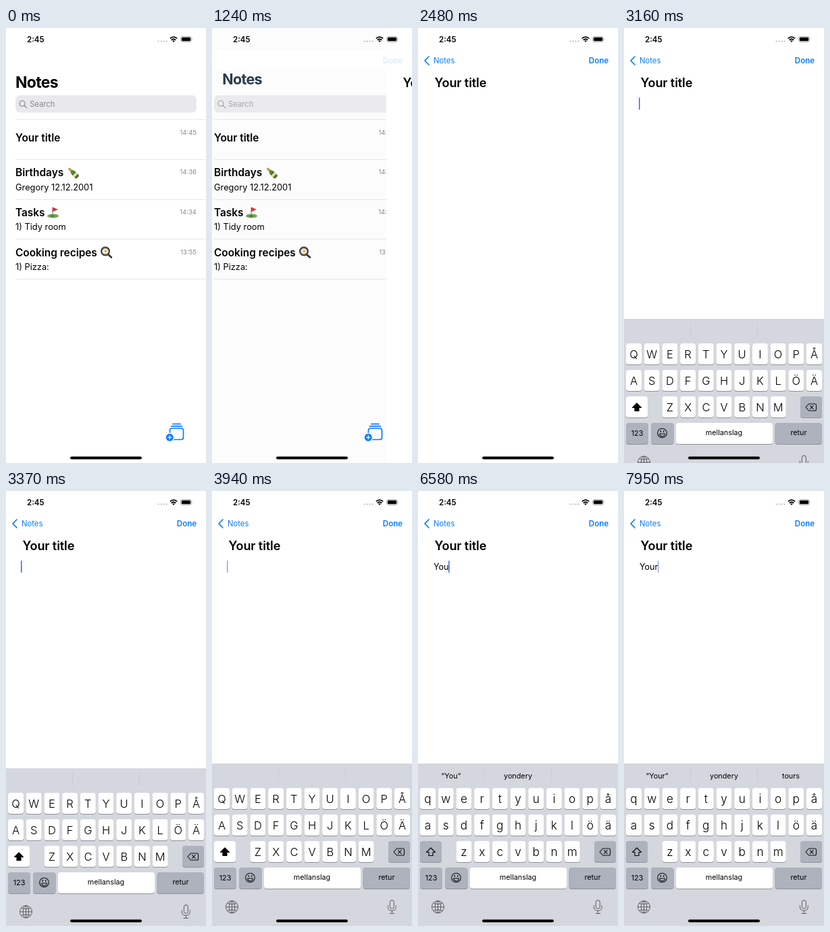
An HTML page for the animation above (8000 ms loop, 296 by 640 pixels).

```html
<!DOCTYPE html>
<html lang="en">
<head>
<meta charset="utf-8">
<title>Notes</title>
<style>
  html, body { margin: 0; width: 100%; height: 100%; overflow: hidden; background: #fff; }
  svg { display: block; width: 296px; height: 640px; font-family: Inter, "Liberation Sans", sans-serif; }
  .row { font-size: 15.4px; font-weight: 600; }
  .sub { font-size: 12.8px; }
  .time { font-size: 9.5px; fill: #8a8a8e; text-anchor: end; }
  .blue { fill: #0a7cff; }
  .line { fill: none; stroke-linecap: round; stroke-linejoin: round; }
  #keys text { text-anchor: middle; }
  .upper { font-size: 16.5px; font-weight: 350; }
  .lower { font-size: 17.2px; font-weight: 330; }
  .small { font-size: 10.8px; }
  #popup { filter: drop-shadow(0 1px 2px #0004); }
</style>
</head>
<body>
<svg viewBox="0 0 296 640">
  <rect width="296" height="640" fill="#fff"/>

  <g id="list">
    <g id="search">
      <rect x="14" y="99" width="268" height="25.5" rx="6.5" fill="#e9e9eb"/>
      <g class="line" stroke="#85858a" stroke-width="1.2">
        <circle cx="24" cy="111" r="4"/><path d="M27 114l3.5 3.5"/>
      </g>
      <text x="35" y="116" font-size="11.3" fill="#8a8a8e">Search</text>
    </g>
    <path d="M14 134.5H296M14 193.5H296M14 252.5H296M14 310.5H296M14 369.5H296" stroke="#e9e9e9"/>
    <g id="rows"></g>
    <g transform="translate(99.5 213) rotate(-45)">
      <rect x="-3.5" y="-1.5" width="7" height="11" rx="2" fill="#47702f"/>
      <path d="M-3.5 0L-1.6-5H1.6L3.5 0z" fill="#5d8a3c"/>
      <rect x="-1.7" y="-9.5" width="3.4" height="5.5" rx="1" fill="#b9a14f"/>
      <rect x="-3.5" y="2" width="7" height="4" fill="#e3d9a6"/>
    </g>
    <ellipse cx="69.5" cy="276.5" rx="8.5" ry="3" fill="#6fa653"/>
    <ellipse cx="69" cy="276.5" rx="2.2" ry=".9" fill="#35522c"/>
    <path d="M69 264V276.5" stroke="#8d8d8d" stroke-width="1.2"/>
    <path d="M69 263.5L77 267L69 270.5z" fill="#df3232"/>
    <path d="M151.5 333.5L156 337.5" stroke="#33302f" stroke-width="2.6" stroke-linecap="round"/>
    <circle cx="147" cy="328.5" r="7" fill="#3b3b3d"/>
    <circle cx="147" cy="328.5" r="5.4" fill="#77716a"/>
    <ellipse cx="147" cy="328.5" rx="4.5" ry="4" fill="#f6f3ea"/>
    <circle cx="147.3" cy="328.3" r="2" fill="#f0b53a"/>
    <g class="line" stroke="#0a7cff" stroke-width="1.7">
      <rect x="242.5" y="589" width="20" height="16.5" rx="3"/>
      <path d="M244.5 585.8H260.5M247 582.7H258"/>
    </g>
    <circle cx="242.3" cy="602.3" r="6.8" fill="#fff"/>
    <circle cx="242.3" cy="602.3" r="5.5" class="blue"/>
    <path d="M239.3 602.3h6M242.3 599.3v6" stroke="#fff" stroke-width="1.3"/>
  </g>
  <rect id="shade" width="296" height="640"/>

  <g id="detail">
    <rect width="296" height="640" fill="#fff"/>
    <text x="24.5" y="87" font-size="18.1" font-weight="600" letter-spacing="-.12">Your title</text>
    <text id="typed" x="23" y="116.3" font-size="12.5"></text>
    <rect id="caret" y="102.5" width="1.5" height="17.5" fill="#3a62e6"/>
  </g>

  <rect id="strip" y="33" width="296" height="30" fill="#fff"/>
  <text id="bigTitle" font-weight="700" letter-spacing="-.03em">Notes</text>
  <text id="back" class="blue">Notes</text>
  <path id="chevron" class="line" d="M16 42L10 48L16 54" stroke="#0a7cff" stroke-width="1.7"/>
  <text id="done" class="blue" x="282" y="52" font-size="11.5" font-weight="600" text-anchor="end">Done</text>

  <g id="keyboard">
    <rect y="401" width="296" height="239" fill="#d4d7dd"/>
    <path d="M98.5 408v19M197.5 408v19" stroke="#c8cbd1"/>
    <g id="keys"></g>
    <path id="shift" class="line" d="M19 525l-6.5 6.5h3.5v5h6v-5h3.5z" stroke="#000" stroke-width="1.1"/>
    <g class="line" stroke="#111" stroke-width="1.1">
      <path d="M269 531l4.5-5h9q2 0 2 2v6q0 2-2 2h-9zM275.5 528.7l4.6 4.6M280.1 528.7l-4.6 4.6"/>
      <circle cx="56.5" cy="569" r="6.8"/>
      <path d="M52.6 570h7.8a3.9 3.9 0 0 1-7.8 0z"/>
      <path d="M54.3 566v1M58.7 566v1" stroke-width="1.6"/>
    </g>
    <g class="line" stroke="#5b5d62">
      <circle cx="29.5" cy="612" r="9"/><ellipse cx="29.5" cy="612" rx="4.2" ry="9"/>
      <path d="M29.5 603v18M20.5 612h18M22.5 606.5q7 3 14 0M22.5 617.5q7-3 14 0"/>
      <rect x="263.3" y="602" width="6" height="12.5" rx="3"/>
      <path d="M260.3 610v1.5q0 6 6 6t6-6V610M266.3 617.5v4M263 621.5h6.6"/>
    </g>
    <g id="popup">
      <path fill="#fff" d="M-20 402q0-8 8-8H12q8 0 8 8V421c0 9-8.5 9-8.5 18V464q0 4-4 4H-7.5q-4 0-4-4V439c0-9-8.5-9-8.5-18z"/>
      <text id="popLetter" y="423.5" text-anchor="middle" font-size="26.5" font-weight="300"></text>
    </g>
  </g>

  <text x="31" y="20.5" font-size="11.5" font-weight="600">2:45</text>
  <path d="M225.5 19.5h12.1" stroke="#b5b5b5" stroke-width="2" stroke-linecap="round" stroke-dasharray=".1 3.9"/>
  <g class="line" stroke="#000" stroke-width="1.8" style="stroke-linecap:butt">
    <path d="M242.8 15.4q5.2-4.6 10.4 0M244.8 17.7q3.2-2.8 6.4 0"/>
  </g>
  <path d="M246.2 19q1.8-1.4 3.6 0L248 20.9z"/>
  <rect x="258.5" y="12.5" width="16" height="8" rx="2.4" fill="none" stroke="#aaa" stroke-width=".9"/>
  <rect x="259.8" y="13.8" width="13.4" height="5.4" rx="1.3"/>
  <path d="M275.6 15q1.4 1.5 0 3z" fill="#aaa"/>
  <rect x="95" y="630.6" width="106" height="4" rx="2"/>
</svg>

<script>
const $ = id => document.getElementById(id);
const set = (el, attrs) => { for (const k in attrs) el.setAttribute(k, attrs[k]); };
const make = (tag, parent, attrs, text = '') => {
  const el = document.createElementNS('http://www.w3.org/2000/svg', tag);
  set(el, attrs);
  el.textContent = text;
  return parent.appendChild(el);
};

// Note rows: title, subtitle, time, title baseline, time baseline
[
  ['Your title', '', '14:45', 167, 156.5],
  ['Birthdays', 'Gregory 12.12.2001', '14:36', 218, 215],
  ['Tasks', '1) Tidy room', '14:34', 276.5, 274],
  ['Cooking recipes', '1) Pizza:', '13:55', 335.5, 332.5],
].forEach(([title, sub, time, y, timeY]) => {
  make('text', $('rows'), { class: 'row', x: 14, y }, title);
  make('text', $('rows'), { class: 'sub', x: 14, y: y + 20.5 }, sub);
  make('text', $('rows'), { class: 'time', x: 282, y: timeY }, time);
});

// Keyboard
const keys = $('keys'), GREY = '#adb2bc';
const key = (x, y, w, fill = '#fff') => {
  make('rect', keys, { x, y: y + 1, width: w, height: 31, rx: 3.8, fill: '#8f9298' });
  return make('rect', keys, { x, y, width: w, height: 31, rx: 3.8, fill });
};
const letters = [['qwertyuiopå', 14.5, 437], ['asdfghjklöä', 14.5, 476], ['zxcvbnm', 68, 515]];
const keyX = (i, x0) => x0 + i * 26.7;
for (const [row, x0, y] of letters)
  [...row].forEach((c, i) => key(keyX(i, x0) - 11.5, y, 23));
const shiftKey = key(3, 515, 32);
key(261, 515, 32, GREY);
key(3, 554, 33, GREY);
key(40, 554, 33.5, GREY);
key(77, 554, 143);
key(223.5, 554, 69.5, GREY);
const label = (x, y, text) => make('text', keys, { class: 'small', x, y }, text);
label(19.5, 573, '123');
label(148, 572, 'mellanslag');
label(258.5, 572, 'retur');
const [upper, lower] = ['upper', 'lower'].map(cls => {
  const g = make('g', keys, { class: cls });
  for (const [row, x0, y] of letters)
    [...row].forEach((c, i) => make('text', g, { x: keyX(i, x0), y: y + 21.5 },
      cls === 'upper' ? c.toUpperCase() : c));
  return g;
});
const hints = [49, 148, 247].map(x => label(x, 422.5, ''));

// Each track is a list of [start, value], held until the next start
const at = (track, t) => track.reduce((v, [start, next]) => t >= start ? next : v, track[0][1]);
const held = (times, t) => times.reduce((v, s) => t >= s ? s : v, 0);

const pushTimes = [1240, 1350, 1460, 1570, 1690];
const riseTimes = [2940, 3050, 3160, 3270, 3380, 3490, 3610];
const typed = [[0, ''], [4700, 'Y'], [5480, 'Yo'], [6060, 'You'], [7590, 'Your']];
const pressed = [[0, ''], [4470, 'Y'], [4700, ''], [5360, 'o'], [5480, ''],
  [5830, 'u'], [6060, ''], [7360, 'r'], [7590, '']];
const hintTracks = [
  [[0, ''], [5030, '”Y”'], [5690, '”Yo”'], [6580, '”You”'], [7820, '”Your”']],
  [[0, ''], [5030, 'yes'], [5690, 'yondery']],
  [[0, ''], [5030, 'yondery'], [5690, 'younger'], [6440, ''], [7820, 'tours']],
];
const caretTrack = [[0, 0], [2940, 1], [3490, .5], [3610, 0], [3940, .6], [4700, 1],
  [6700, .4], [6820, 0], [7140, 1], [7950, .5]];

const spring = ms => {
  const a = Math.max(0, ms) * .0155, p = 1 - (1 + a) * Math.exp(-a);
  return p > .995 ? 1 : p;
};
const mix = (a, b, p) => a + (b - a) * p;
const clamp = v => Math.min(1, Math.max(0, v));
const show = (el, on) => el.style.display = on ? '' : 'none';

function draw(t) {
  const p = spring(held(pushTimes, t) - 1200);
  set($('list'), { transform: `translate(${Math.round(-89 * p)})` });
  set($('search'), { opacity: clamp(1 - 2 * p) });
  set($('shade'), { opacity: .1 * p });
  set($('detail'), { transform: `translate(${Math.round(296 * (1 - p))})` });
  show($('strip'), p > 0);
  const title = { x: mix(14, 23, p), y: mix(88, 52, p), 'font-size': mix(23, 11.3, p) };
  set($('bigTitle'), { ...title, opacity: clamp(1 - 1.5 * p) });
  set($('back'), { ...title, opacity: clamp(1.5 * p) });
  set($('chevron'), { opacity: clamp((p - .92) / .08) });
  set($('done'), { opacity: clamp(1.1 * p) });

  const rise = spring(held(riseTimes, t) - 2920);
  set($('keyboard'), { transform: `translate(0 ${Math.round(239 * (1 - rise))})` });
  show($('keyboard'), rise > 0);

  const text = at(typed, t), caps = !text;
  $('typed').textContent = text;
  set($('caret'), { x: text ? 22.7 + $('typed').getComputedTextLength() : 22, opacity: at(caretTrack, t) });
  show(upper, caps);
  show(lower, !caps);
  set(shiftKey, { fill: caps ? '#fff' : GREY });
  $('shift').style.fill = caps ? '#000' : 'none';
  hints.forEach((el, i) => el.textContent = at(hintTracks[i], t));

  const c = at(pressed, t);
  show($('popup'), c);
  if (c) {
    set($('popup'), { transform: `translate(${keyX(letters[0][0].indexOf(c.toLowerCase()), 14.5)})` });
    $('popLetter').textContent = c;
  }
}

function frame() {
  draw(performance.now() % 8000);
  requestAnimationFrame(frame);
}
frame();
</script>
</body>
</html>
```
